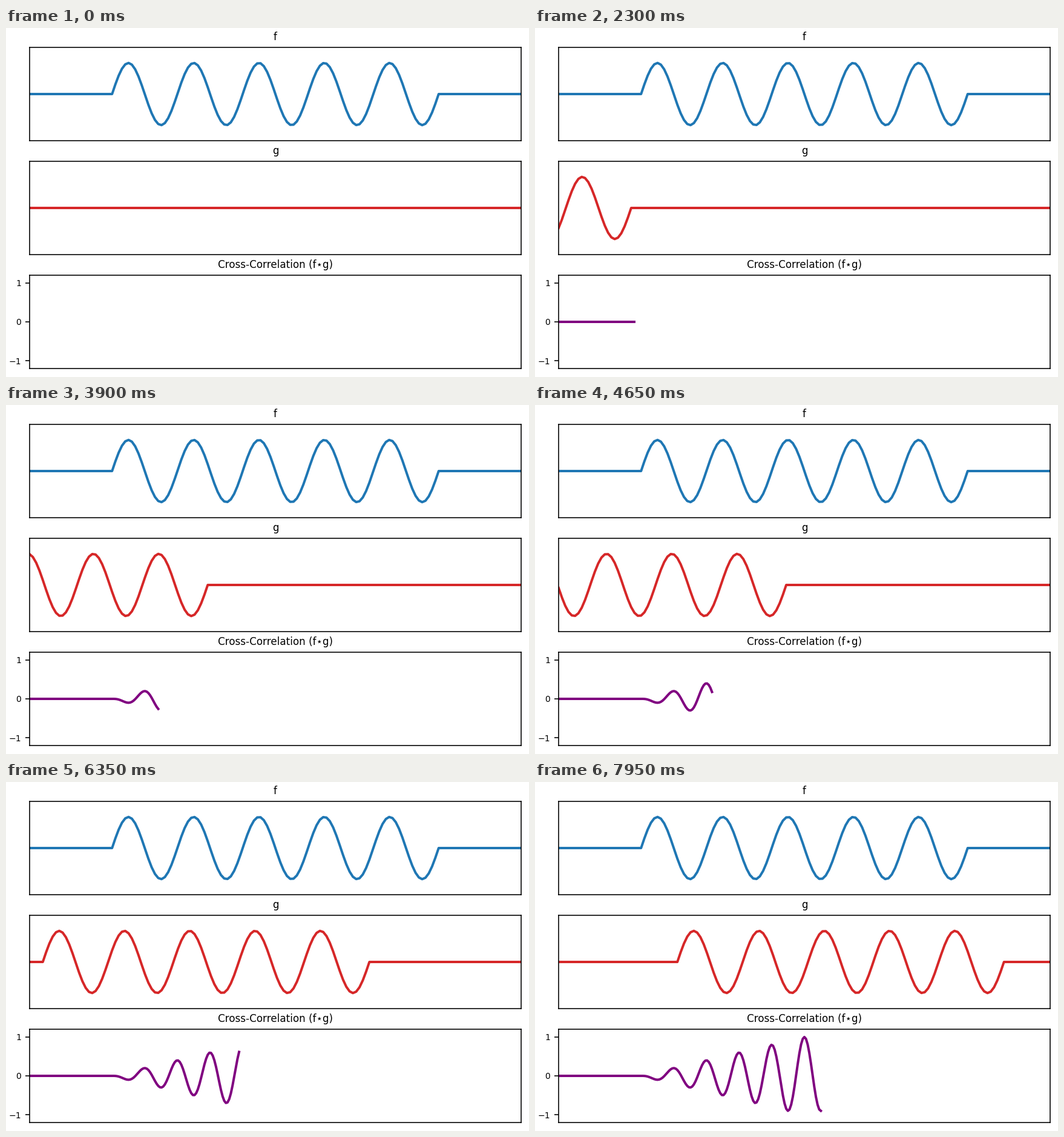
Write a matplotlib script that moves like this. It is 864 px wide and 576 px high and loops after 8000 ms.

```python
import numpy as np
import matplotlib.pyplot as plt
from matplotlib.animation import FuncAnimation

W, H, DPI = 864, 576, 144
FRAMES, STEP_MS = 160, 50
PAD, BURST, CYCLES = 25, 100, 5

plt.rcParams.update({"font.family": "DejaVu Sans", "font.size": 7})

# A sine burst with silence on both sides
burst = np.sin(2 * np.pi * CYCLES * np.linspace(0, 1, BURST))
f = np.pad(burst, PAD)
n = len(f)
x = np.arange(n)
corr = np.correlate(f, f, "full")
corr /= corr.max()
lags = np.arange(len(corr))


def shifted(shift):
    """The burst signal moved right by shift samples, zero elsewhere."""
    src = x - shift
    inside = (src >= 0) & (src < n)
    return np.where(inside, f[np.clip(src, 0, n - 1)], 0.0)


fig = plt.figure(figsize=(W / DPI, H / DPI), dpi=DPI, facecolor="white")


def panel(top, title, last, limit, yticks=()):
    left, width, height = 39, 812, 154
    ax = fig.add_axes([left / W, 1 - (top + height) / H, width / W, height / H])
    ax.set_title(title)
    ax.set_xlim(0, last)
    ax.set_ylim(-limit, limit)
    ax.set_xticks([])
    ax.set_yticks(yticks)
    return ax


ax_f = panel(32, "f", n - 1, 1.5)
ax_g = panel(220, "g", n - 1, 1.5)
ax_c = panel(408, "Cross-Correlation (f\u22c6g)", len(corr) - 1, 1.2, (-1, 0, 1))

ax_f.plot(x, f, color="tab:blue", lw=2)
line_g, = ax_g.plot(x, np.zeros(n), color="tab:red", lw=2)
line_c, = ax_c.plot([], [], color="purple", lw=2)


def update(i):
    line_g.set_ydata(shifted(i - n + 2))
    count = i + 1 if i > 1 else 0
    line_c.set_data(lags[:count], corr[:count])
    return line_g, line_c


anim = FuncAnimation(fig, update, frames=FRAMES, interval=STEP_MS,
                     init_func=lambda: update(0), repeat=True, repeat_delay=0)
plt.show()
```
